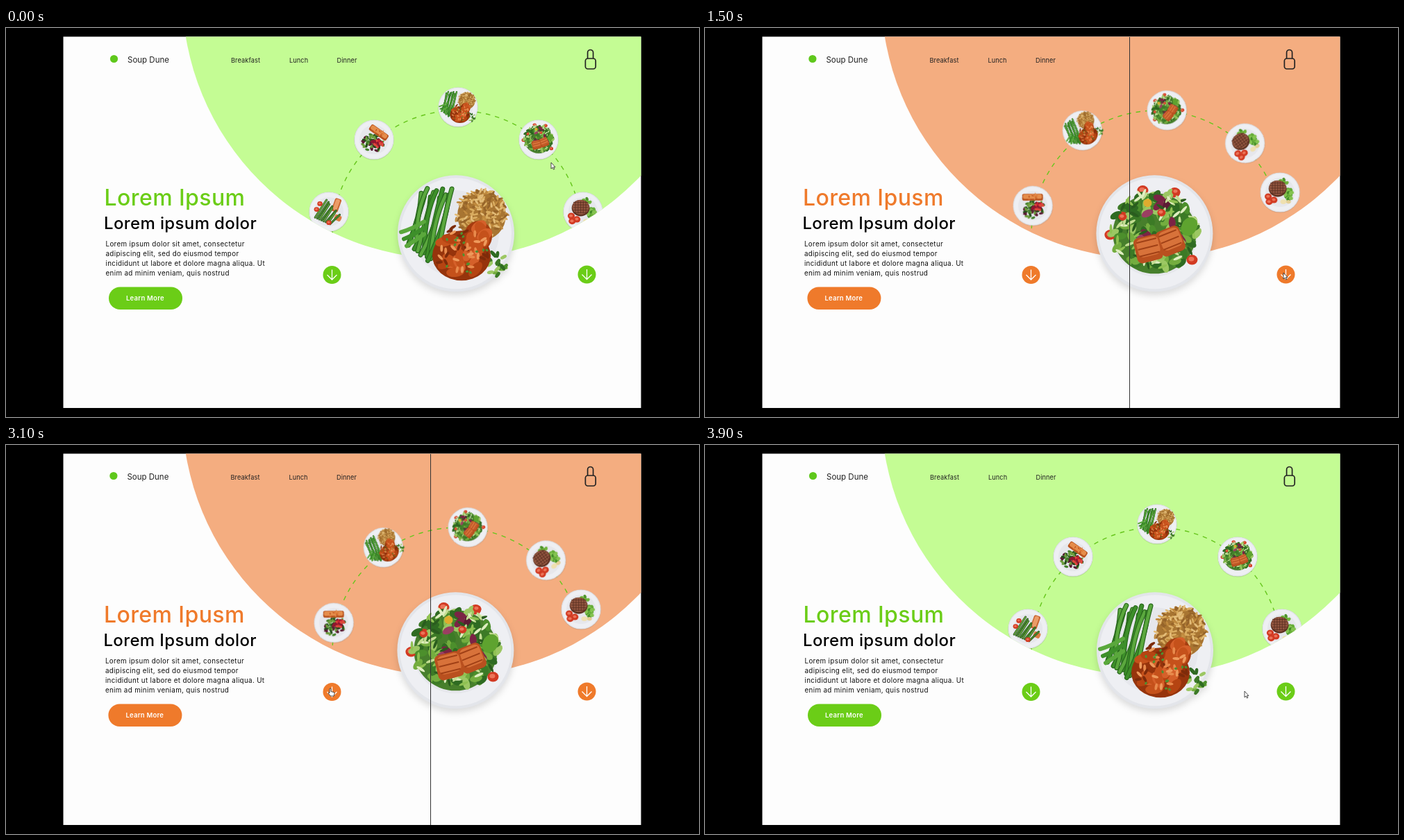
Write an HTML page that moves like this. It is 998x561 px and loops after 4 s.

```html
<!DOCTYPE html>
<html lang="en">
<head>
<meta charset="utf-8">
<title>Menu carousel</title>
<style>
  html, body { margin: 0; width: 100%; height: 100%; overflow: hidden; background: #000; }
  svg { display: block; width: 998px; height: 561px; font-family: Inter, "Open Sans", sans-serif; }
  .nav { font-size: 9.2px; letter-spacing: .1px; fill: #222; }
  .title { font-size: 32px; font-weight: 500; letter-spacing: .42px; }
  .sub { font-size: 24px; font-weight: 500; letter-spacing: .37px; fill: #000; }
  .body { font-size: 9.8px; letter-spacing: .35px; fill: #111; }
  .more { font-size: 9.5px; font-weight: 600; letter-spacing: .25px; fill: #fff; }
  .small { filter: drop-shadow(0 1px 2px #0004); }
  .big { filter: drop-shadow(0 5px 5px #0002); }
</style>
</head>
<body>
<svg viewBox="0 0 998 561">
  <defs>
    <clipPath id="panel"><rect x="82.5" y="12.5" width="832" height="535.5"/></clipPath>
    <clipPath id="bowl"><circle cx="636.2" cy="-49.6" r="382.4"/></clipPath>
    <g id="arrow">
      <circle r="13"/>
      <path d="M0-7.5V7M-7 0 0 7 7 0" fill="none" stroke="#fff" stroke-width="1.3"/>
    </g>
    <g id="dishes"></g>
  </defs>
  <rect width="998" height="561"/>
  <g clip-path="url(#panel)">
    <rect x="82" y="12" width="833" height="537" fill="#fdfdfd"/>
    <circle id="backdrop" cx="636.2" cy="-49.6" r="382.4"/>

    <g clip-path="url(#bowl)">
      <g id="wheel">
        <path d="M470 299A180 180 0 1 1 819 361" fill="none" stroke="#66c61c" stroke-width="1.4" stroke-dasharray="6.5 7"/>
      </g>
    </g>

    <g id="copy">
      <circle cx="155.5" cy="44.5" r="5.6" fill="#5fc81c"/>
      <text x="175" y="49.6" font-size="11.5" fill="#222">Soup Dune</text>
      <g class="nav">
        <text x="324" y="49.5">Breakfast</text>
        <text x="408" y="49.5">Lunch</text>
        <text x="476.5" y="49.5">Dinner</text>
      </g>
      <g class="body">
        <text x="143.5" y="314.5">Lorem ipsum dolor sit amet, consectetur</text>
        <text x="143.5" y="328.8">adipiscing elit, sed do eiusmod tempor</text>
        <text x="143.5" y="343.1">incididunt ut labore et dolore magna aliqua. Ut</text>
        <text x="143.5" y="357.4">enim ad minim veniam, quis nostrud</text>
      </g>
      <g id="states">
        <g id="green">
          <g class="fade">
            <text class="title" x="141.5" y="255.5" fill="#6bcd17">Lorem Ipsum</text>
            <text class="sub" x="141" y="290">Lorem ipsum dolor</text>
          </g>
          <rect class="button" y="-16.3" width="106" height="32.6" rx="16.3" fill="#6bcd17"/>
          <use class="big" href="#beans"/>
        </g>
        <g id="orange">
          <g class="fade">
            <text class="title" x="141.5" y="255.5" fill="#ef7a2b">Lorem Ipusm</text>
            <text class="sub" x="141" y="290">Lorem Ipsum dolor</text>
          </g>
          <rect class="button" y="-16.3" width="106" height="32.6" rx="16.3" fill="#ef7a2b"/>
          <use class="big" href="#salad"/>
        </g>
      </g>
      <text class="more" x="173" y="393.2">Learn More</text>
    </g>

    <g fill="none" stroke="#222" stroke-width="1.7">
      <rect x="834.4" y="44" width="14.8" height="15" rx="3.5"/>
      <path d="M837.6 44V35.5a4 4 0 0 1 8 0V44"/>
    </g>
    <g id="arrows">
      <use href="#arrow" x="469.5" y="356"/>
      <use href="#arrow" x="836.5" y="355.5"/>
    </g>
    <rect id="line" x="611" y="13" width="1" height="535" fill="#333"/>
    <g id="cursor" fill="#fff" stroke="#222" stroke-width=".8" stroke-linejoin="round">
      <path id="pointer" d="M0 0V9l2-1.9 1.5 3 1.4-.7L3.5 6.6H6z"/>
      <path id="hand" d="M0 1a1 1 0 0 1 2 0V4.6l4 .9q1.2.4 1 1.6L6.2 11H1.4L-1.8 7q0-1.3 1-1L0 6.8z"/>
    </g>
  </g>
</svg>

<script>
const $ = id => document.getElementById(id);

let seed = 7;
const rnd = () => (seed = seed * 16807 % 2147483647) / 2147483647;
const pick = list => list[rnd() * list.length | 0];

const oval = (x, y, rx, ry, fill, turn = 0) =>
  `<ellipse rx="${rx}" ry="${ry}" fill="${fill}" transform="translate(${x.toFixed(1)} ${y.toFixed(1)}) rotate(${turn | 0})"/>`;
const slab = (x, y, w, h, turn, fill) =>
  `<rect x="${-w / 2}" y="${-h / 2}" width="${w}" height="${h}" rx="7" fill="${fill}" transform="translate(${x} ${y}) rotate(${turn})"/>`;
const stroke = (d, color, width) =>
  `<path d="${d}" fill="none" stroke="${color}" stroke-width="${width}" stroke-linecap="round"/>`;
const repeat = (n, f) => Array.from({ length: n }, (_, i) => f(i)).join('');

// n random ovals inside an oval area
const scatter = (n, x, y, rx, ry, w, h, colors) => repeat(n, () => {
  const a = rnd() * 2 * Math.PI, d = Math.sqrt(rnd());
  return oval(x + rx * d * Math.cos(a), y + ry * d * Math.sin(a), w, h, pick(colors), rnd() * 180);
});
const tomatoes = (r, spots) => spots.map(([x, y]) =>
  oval(x, y, r, r * .9, '#d23a22') + oval(x - 1, y - 1, r * .5, r * .4, '#ec7459')).join('');

const leaf = ['#2f6b22', '#4c8f2c', '#74ad3f', '#9cc763', '#3c7a26'];
const salmon = ['#d9702f', '#e58a4a', '#b9501f'];
const grill = (x, y, w, h, turn) => slab(x, y, w, h, turn, '#b9501f') + slab(x, y - 3, w - 6, h - 10, turn, '#d8723a') +
  `<g transform="translate(${x} ${y}) rotate(${turn})">` +
  repeat(3, i => stroke(`M${-w / 2 + 5} ${i * 10 - 12}H${w / 2 - 5}`, '#a04016', 2)) + '</g>';
const plate = oval(0, 0, 84, 84, '#e3e5ea') + oval(0, 0, 80, 80, '#eeeff3') + oval(0, 0, 62, 62, '#e6e7ec');

const dishes = {
  beans: () =>
    oval(37, -26, 35, 36, '#a87532') +
    scatter(170, 37, -28, 38, 35, 4, 1.5, ['#d9ac60', '#c08a3e', '#e3bc78', '#96642a']) +
    repeat(11, i => {
      const k = i / 10, x = -50 + 44 * k, y = -58 + 7 * Math.sin(i * 2.4);
      const d = `M${x} ${y}Q${x - 2 - 8 * (i % 3)} ${y + 36} ${-68 + 36 * k + 5 * Math.sin(i * 4)} ${14 + 28 * k}`;
      return stroke(d, '#2a6a1e', 7) + stroke(d, i % 2 ? '#3d8f2a' : '#5ba83e', 4.5);
    }) +
    repeat(3, i => stroke(`M${-79 + i * 4} ${i * 10 - 2}Q-64 ${i * 10 - 6}-46 ${i * 9 - 17}`, i % 2 ? '#3d8f2a' : '#5aa83c', 6)) +
    scatter(22, 59, 43, 15, 17, 5, 2.5, leaf) +
    oval(8, 32, 42, 36, '#96340c') + oval(32, 4, 20, 22, '#a53c10') +
    scatter(16, 4, 30, 36, 32, 13, 7, ['#c5511b', '#d5602a', '#b54412']) +
    scatter(6, 30, 6, 14, 20, 12, 8, ['#c5511b', '#d5602a']) +
    scatter(34, 10, 24, 40, 36, 5, 2, ['#e88a4c', '#ee9a5c', '#7d2b0a']) +
    scatter(16, 12, 24, 38, 34, 2.2, 1.6, ['#4f9130']),

  salad: () =>
    oval(0, 0, 60, 58, '#477f2c') +
    tomatoes(8, [[-46, -24], [29, -59], [-17, -62], [54, 38], [-64, 2]]) +
    scatter(100, 0, -2, 62, 58, 9, 5, leaf) +
    scatter(16, -8, -12, 58, 46, 9, 5, ['#7b2445', '#9a3f62', '#5c1c34']) +
    scatter(70, 0, -6, 64, 56, 7, 2, ['#c3dd92', '#dfeec0', '#2a5c1e', '#8fc152']) +
    tomatoes(6, [[-46, -24], [10, -30], [31, -60]]) +
    oval(-10, -44, 6, 6, '#dfac2e') + oval(50, -10, 11, 14, '#5ea32f', 30) +
    grill(23, 11, 36, 38, -22) + grill(-9, 22, 38, 37, -14),

  steak: () =>
    scatter(26, 38, 8, 17, 24, 9, 7, ['#3f8a26', '#66ad38', '#84c350']) +
    scatter(12, 18, -46, 18, 9, 8, 6, ['#4c9429', '#70b53c']) +
    oval(14, 40, 13, 10, '#efe0b0') + oval(36, 40, 10, 8, '#e5d096') +
    oval(-10, -16, 38, 35, '#5c3020') + oval(-10, -19, 35, 31, '#935640') +
    repeat(5, i => stroke(`M${-32 + i * 11}-44V6M-40 ${-40 + i * 11}H20`, '#5a3022', 2.5)) +
    tomatoes(15, [[-50, 18], [-26, 32], [-46, 40]]),

  fish: () =>
    scatter(60, -2, 14, 46, 38, 9, 5, ['#254d1b', '#44802b', '#6b9d3c', '#5b1c34']) +
    scatter(18, 14, 14, 24, 18, 8, 5, ['#c81f31', '#8f1730', '#e0473c']) +
    slab(20, -30, 88, 29, 35, '#b9531f') + slab(21, -33, 80, 19, 35, '#e58d4b') +
    scatter(12, 20, -30, 24, 14, 5, 2, salmon),

  spears: () =>
    slab(32, -28, 28, 58, 20, '#c96532') + slab(32, -30, 18, 48, 20, '#eb9c68') +
    slab(38, 26, 30, 24, 25, '#da7c43') +
    repeat(8, i => {
      const d = `M${-58 + i * 9} ${24 + i * 4}L${-10 + i * 7 + 8 * Math.sin(i * 3)} ${-50 + i * 9}`;
      return stroke(d, '#24541b', 9) + stroke(d, i % 2 ? '#4b8a2d' : '#6aa740', 5);
    }) +
    tomatoes(11, [[-52, -10], [-38, -34], [0, 46]])
};

$('dishes').innerHTML = Object.entries(dishes)
  .map(([name, draw]) => `<g id="${name}">${plate}${draw()}</g>`).join('');

$('wheel').innerHTML += [
  ['spears', 465, 265, 0], ['fish', 530, 161, 0], ['beans', 651, 114, 0],
  ['salad', 767, 161, 0], ['steak', 831, 265, 0], ['steak', 831, 352, 35.5]
].map(([name, x, y, turn]) =>
  `<use class="small" href="#${name}" transform="translate(${x} ${y}) rotate(${turn}) scale(.34)"/>`).join('');

const LOOP = 4000, STEP = 100;
const clamp = v => Math.min(1, Math.max(0, v));
const smooth = v => v * v * (3 - 2 * v);
const ramp = (t, start, dur) => smooth(clamp((t - start) / dur));
const mix = (a, b, k) => `rgb(${a.map((v, i) => Math.round(v + (b[i] - v) * k))})`;

// time, x, y of the cursor tip
const path = [
  [0, 785, 194], [600, 827, 346], [1200, 827, 346], [1300, 833, 353], [1900, 833, 353],
  [2500, 466, 351], [3100, 466, 351], [3200, 463, 351], [3500, 463, 351], [3900, 777, 355], [4000, 785, 194]
];

function tipAt(t) {
  const i = path.findIndex(p => p[0] > t);
  const [t0, x0, y0] = path[i - 1], [t1, x1, y1] = path[i];
  const k = smooth((t - t0) / (t1 - t0));
  return [x0 + (x1 - x0) * k, y0 + (y1 - y0) * k];
}

function setState(name, k, lift) {
  const g = $(name);
  g.style.display = k > 0 ? '' : 'none';
  g.querySelector('.fade').style.opacity = k;
  const button = g.querySelector('.button');
  button.style.opacity = k;
  button.setAttribute('transform', `translate(148 389.7) scale(${k})`);
  g.querySelector('.big').setAttribute('transform',
    `translate(648 ${296.3 - lift * (1 - k)}) scale(${.13 + .87 * k})`);
}

function draw(t) {
  const p = ramp(t, 1210, 290) - ramp(t, 3109, 290);
  $('backdrop').setAttribute('fill', mix([196, 252, 148], [244, 173, 128], p));
  $('arrows').setAttribute('fill', mix([107, 205, 23], [239, 122, 43], p));
  $('wheel').setAttribute('transform', `rotate(${-35.5 * p} 650 299)`);
  $('copy').setAttribute('transform', `translate(${p > 0 ? -.6 : 0} 0)`);
  $('line').style.display = p > .98 ? '' : 'none';

  setState('green', 1 - p, 0);
  setState('orange', p, 21);
  // the incoming state lies on top
  const top = $(t < 2500 ? 'orange' : 'green');
  if ($('states').lastElementChild !== top) $('states').append(top);

  const over = (t >= 600 && t <= 1200) || (t >= 2500 && t <= 3100);
  $('hand').style.display = over ? '' : 'none';
  $('pointer').style.display = over ? 'none' : '';
  $('cursor').setAttribute('transform', `translate(${tipAt(t)})`);
}

const begin = performance.now();
function tick() {
  const t = (performance.now() - begin) % LOOP;
  draw(Math.floor(t / STEP) * STEP);
  requestAnimationFrame(tick);
}
tick();
</script>
</body>
</html>
```
